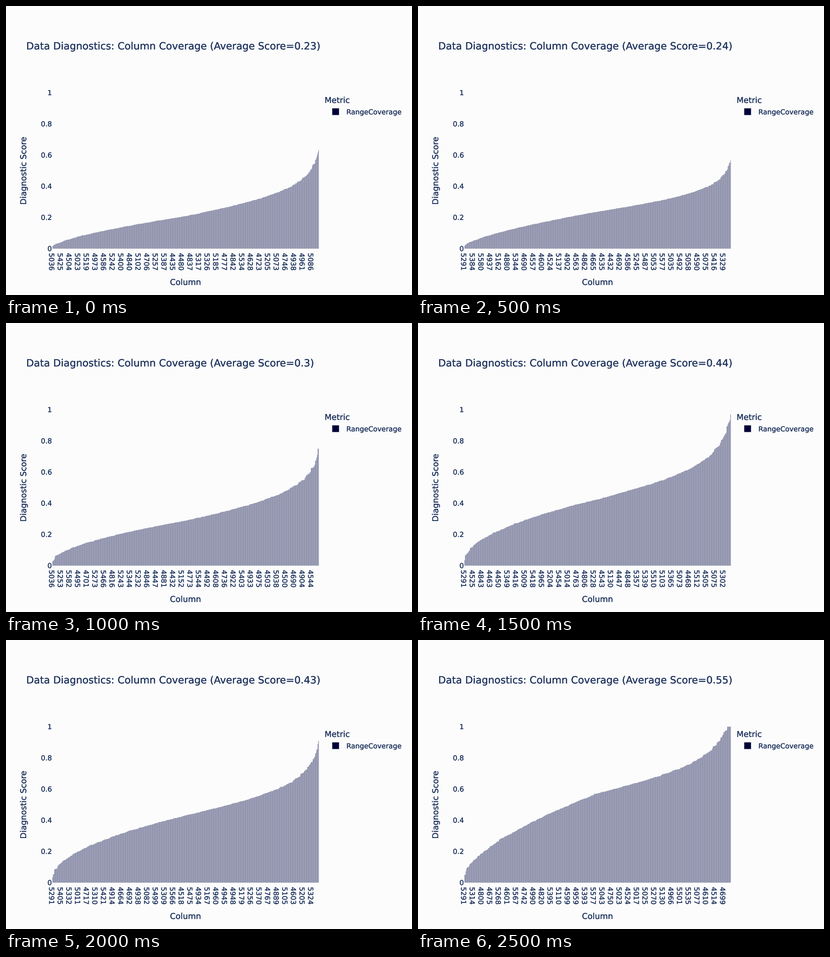
A matplotlib script for the animation above (3 s loop, 885 by 632 pixels).

```python
import numpy as np
import matplotlib.pyplot as plt
from matplotlib.animation import FuncAnimation
from matplotlib.collections import PolyCollection
from matplotlib.patches import Polygon, Rectangle
from matplotlib.patheffects import withStroke

W, H, DPI = 885, 632, 100
BG, INK, NAVY, EDGE = "#fcfcfc", "#20355f", "#000036", "#e5ecf6"
GAP_TONE, BAR_TONE = "#b2b5c6", "#62658a"

LEFT, RIGHT = 101.1, 681.9
ZERO, UNIT = 530.6, 341.0
BARS, LABEL_EVERY = 432, 14

# Score, first column, lowest, middle and highest bar, bend of the lower half
SCENES = [
    ("0.23", 5036, .015, .208, .632, .70),
    ("0.24", 5291, .018, .237, .565, .70),
    ("0.3", 5036, .030, .288, .750, .59),
    ("0.44", 5291, .035, .425, .970, .53),
    ("0.43", 5291, .035, .430, .910, .53),
    ("0.55", 5291, .050, .572, 1.10, .64),
]

plt.rcParams["font.family"] = "DejaVu Sans"
fig = plt.figure(figsize=(W / DPI, H / DPI), dpi=DPI, facecolor=BG)
ax = fig.add_axes([0, 0, 1, 1])
ax.set_xlim(0, W)
ax.set_ylim(H, 0)
ax.axis("off")

edges = np.linspace(LEFT, RIGHT, BARS + 1)
pitch = edges[1] - edges[0]


def write(x, y, text, px, ha="left", angle=0):
    """Place text with its baseline at (x, y), sized in pixels."""
    return ax.text(x, y, text, fontsize=px * 72 / DPI, color=INK, ha=ha,
                   va="baseline", rotation=angle, rotation_mode="anchor",
                   path_effects=[withStroke(linewidth=0.2, foreground=INK)])


def bar_heights(rng, low, mid, high, bend):
    """Sorted scores: a power curve up to the median, a steep tail after it."""
    u = np.sort(np.arange(BARS) + rng.normal(0, 2, BARS)) / (BARS - 1)
    u = np.clip(u, 0, 1)
    u[0], u[-1] = 0, 1
    v = 2 * u - 1
    lower = low + (mid - low) * np.minimum(2 * u, 1) ** bend
    tail = np.arctanh(0.98 * np.maximum(v, 0)) / np.arctanh(0.98)
    return np.minimum(lower + (high - mid) * tail, 1) * UNIT


def column_names(rng, first):
    rest = rng.choice(np.arange(4403, 5595), len(labels) - 1, replace=False)
    return [first, *rest]


def outline(heights):
    """Stepped silhouette of all bars."""
    xs = np.repeat(edges, 2)
    ys = ZERO - np.concatenate([[0], np.repeat(heights, 2), [0]])
    return np.column_stack([xs, ys])


def cores(heights):
    """Dark middle strip of every bar."""
    a, b = edges[:-1] + pitch / 3, edges[:-1] + pitch * 2 / 3
    top, base = ZERO - heights, np.full(BARS, ZERO)
    return np.stack([np.column_stack(p) for p in
                     ((a, base), (a, top), (b, top), (b, base))], axis=1)


title = write(44, 95, "", 21.75)
write(391.3, 610, "Column", 17.7, "center")
write(44, 360, "Diagnostic Score", 17.7, "center", 90)
for tick in ("0", "0.2", "0.4", "0.6", "0.8", "1"):
    write(100, ZERO + 5.4 - UNIT * float(tick), tick, 15.17, "right")

write(694.5, 212, "Metric", 17.7)
write(742, 237, "RangeCoverage", 15.1)
ax.add_patch(Rectangle((710.9, 223.6), 15.2, 15.2, facecolor=NAVY,
                       edgecolor=EDGE, lw=0.45, snap=False))

body = ax.add_patch(Polygon([[0, 0]] * 3, color=GAP_TONE, lw=0, snap=False))
strips = ax.add_collection(PolyCollection(
    [], facecolors=BAR_TONE, linewidths=0, antialiaseds=True, snap=False))
labels = [write(94 + LABEL_EVERY * pitch * i, 540, "", 15.17, angle=270)
          for i in range(BARS // LABEL_EVERY + 1)]


def draw(i):
    score, first, *shape = SCENES[i]
    rng = np.random.default_rng(i)
    heights = bar_heights(rng, *shape)
    title.set_text(
        f"Data Diagnostics: Column Coverage (Average Score={score})")
    body.set_xy(outline(heights))
    strips.set_verts(cores(heights))
    for label, name in zip(labels, column_names(rng, first)):
        label.set_text(str(name))
    return [title, body, strips, *labels]


anim = FuncAnimation(fig, draw, frames=len(SCENES), interval=500,
                     repeat=True, repeat_delay=0)
plt.show()
```
